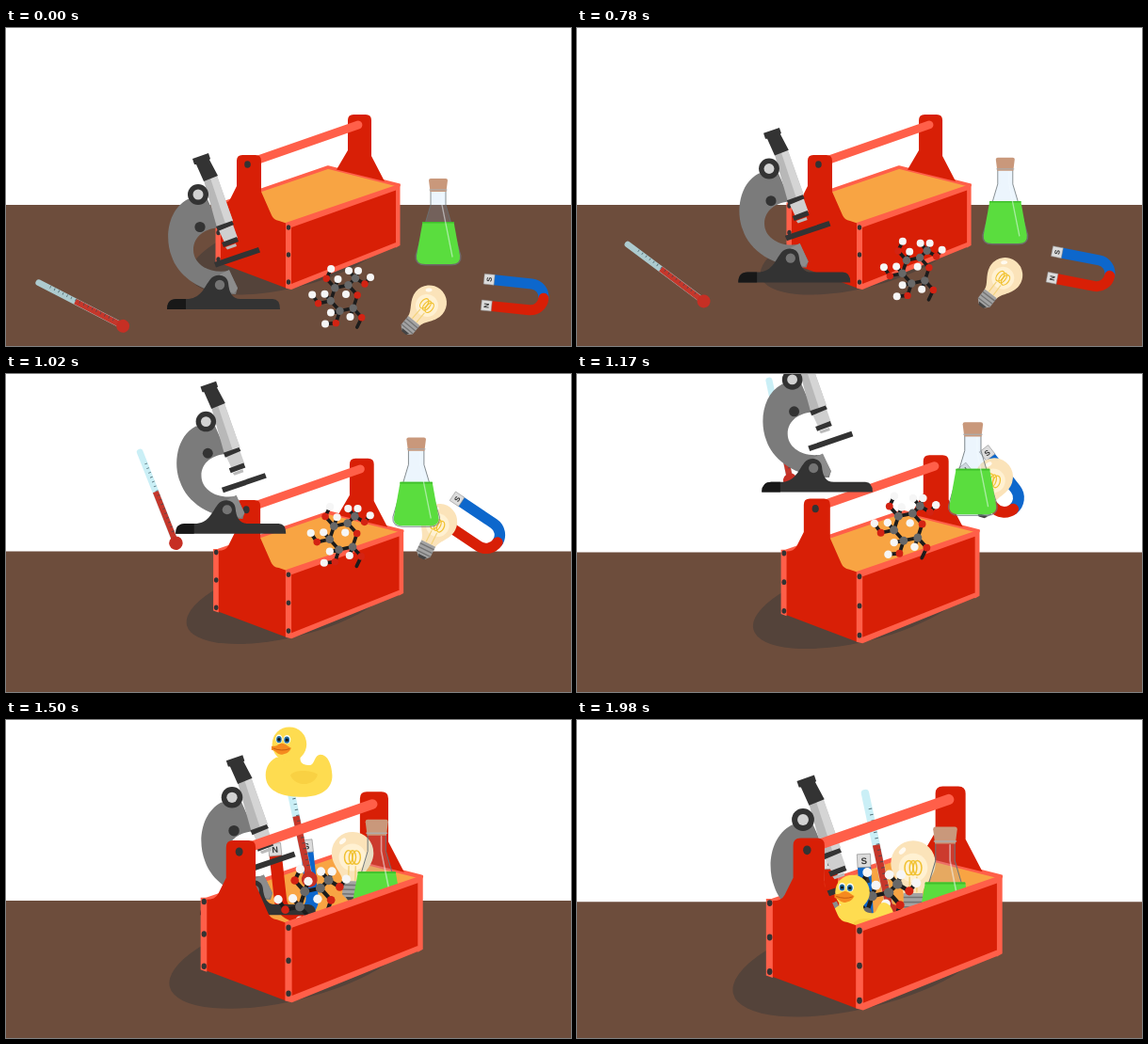
An HTML page for the animation above (4170 ms loop, 600x338 px).

```html
<!DOCTYPE html>
<html lang="en">
<head>
<meta charset="utf-8">
<title>Science toolbox</title>
<style>
  html, body { margin: 0; width: 100%; height: 100%; overflow: hidden; background: #fff; }
  svg { display: block; width: 100%; height: 100%; }
  text { font: bold 7.5px "Liberation Sans", Arial, sans-serif; text-anchor: middle; fill: #333; }
  .red { fill: #d81f06; }
  .coral { fill: #ff5f49; }
  .dark { fill: #333; }
  .line { fill: none; stroke-linecap: round; stroke-linejoin: round; }
</style>
</head>
<body>
<svg viewBox="0 0 600 338">
  <defs>
    <g id="front">
      <path class="line" d="M262 142 374 103" stroke="#ff5f49" stroke-width="8.8"/>
      <path class="red" d="M225 187Q235 188 238 182L245 168V141Q245 135 251 135H265Q271 135 271 141V174L282 199Q284 204 290 205L299 208V277L225 249Z"/>
      <ellipse class="dark" cx="256.500" cy="145" rx="3.300" ry="3.800"/>
      <path class="red" d="M300 208 416 168V232L300 276Z"/>
      <path class="coral" d="M222.500 185.500H228V251L222.500 249Z M297 207 418.500 165.500V231L414 233.500V172.500L303 212V272L414 228V233L303 278 297 276.500Z"/>
      <g class="dark" id="screws"></g>
    </g>
  </defs>

  <g id="camera">
    <path d="M-20 188H620V420H-20Z" fill="#6d4d3c"/>
    <ellipse cx="302.500" cy="237.500" rx="110.500" ry="38.500" transform="rotate(-14 302.500 237.500)" fill="#54433a"/>
    <path d="M228 187 342 147 417 167 300 211Z" fill="#f8a443"/>
    <path class="line" d="M228 187 342 148 417 167" stroke="#ff5f49" stroke-width="3.600" stroke-linejoin="miter"/>
    <path class="red" d="M363 98Q363 92 369 92H382Q388 92 388 98V136L402 163 351 150.500 363 130Z"/>
    <use id="frontUnder" href="#front"/>
  </g>

  <g id="magnet">
    <path class="line" d="M-27 -14H13A14 14 0 0 1 27 0" stroke="#0d67cc" stroke-width="11" stroke-linecap="butt"/>
    <path class="line" d="M-27 14H13A14 14 0 0 0 27 0" stroke="#d81f06" stroke-width="11" stroke-linecap="butt"/>
    <path d="M-38 -19.500h11v11h-11Z M-38 8.500h11v11h-11Z" fill="#dcdcdc" stroke="#888" stroke-width=".5"/>
    <text transform="translate(-29.800 -14) rotate(-90)">S</text>
    <text transform="translate(-29.800 14) rotate(-90)">N</text>
  </g>

  <g id="thermometer">
    <g transform="translate(0 52)">
      <path d="M-3.300 -5V-101Q-3.300 -104 0 -104T3.300 -101V-5Z" fill="#bdebf4" opacity=".8"/>
      <path d="M-3 -4V-57H3V-4Z" fill="#c5372b"/>
      <circle r="7" fill="#c62f24"/>
      <path d="M1.500 -12V-92" stroke="#334c55" stroke-width="2.800" stroke-dasharray=".8 4.200" opacity=".75"/>
    </g>
  </g>

  <g id="microscope">
    <path d="M-11 5C-32 16 -36 46 -28 66C-21 87 4 106 40 106L42 99 33 81C12 85 -5 74 -5 59C-5 44 8 36 23 35L10 5Z" fill="#7b7b7b"/>
    <path d="M23 85 33 80 42 100 38 105 32 103Z" fill="#8c8c8c"/>
    <path d="M6 -15 20 -20 37 28 20 35Z" fill="#b8b8b8"/>
    <path d="M13 -17.500 20 -20 37 28 29 31Z" fill="#d5d5d5"/>
    <path d="M22 38 37 32 42 46 28 51Z" fill="#cfcfcf"/>
    <path d="M29 56 40 52 41 55 31 58.500Z" fill="#bbb"/>
    <g class="dark">
      <path d="M-6 -38 11 -44 13 -38 12 -37 21 -20 6 -14 -2 -32 -4 -32Z"/>
      <path d="M19 34 36 28 38 32 21 39Z M25 51 41 45 43 50 27 56Z M17 72 64 56 66 61.500 19 77.500Z"/>
      <circle r="11"/><circle cx="2" cy="34.500" r="5.600"/>
      <path d="M-33 122Q-33 111 -23 111H-10C4 109 6 99 13 90C19 83 31 85 32 94C33 104 36 111 45 111H79Q87 111 87 122Z"/>
    </g>
    <path d="M-33 122Q-33 111 -23 111H-13V122Z" fill="#181818"/>
    <circle r="5.500" fill="#d2d2d2"/>
    <circle cx="23" cy="96" r="5.200" fill="#747474"/>
  </g>

  <g id="bulb">
    <path d="M-8 26C-8 18 -18.500 12 -18.500 0A18.500 18.500 0 0 1 18.500 0C18.500 12 8 18 8 26Z" fill="#fbe3b9"/>
    <circle cy="4" r="12" fill="#fff1d2"/>
    <path class="line" d="M-3 24V12M3 24V12" stroke="#f2d27c" stroke-width="1.200"/>
    <g class="line" stroke="#f1c232" stroke-width="1.200">
      <ellipse cx="-3.500" cy="4" rx="3.500" ry="6"/><ellipse cx="3.500" cy="4" rx="3.500" ry="6"/><ellipse cy="4" rx="3" ry="6"/>
    </g>
    <ellipse cx="-9" cy="-10" rx="3.500" ry="2" transform="rotate(-45 -9 -10)" fill="#fffaf0"/>
    <path d="M-8 25H8V37L4 41H-4L-8 37Z" fill="#a3a3a3"/>
    <path d="M-8 28.500H8M-8 32.500H8M-8 36.500H8" stroke="#747474" stroke-width="1.300"/>
    <path d="M-5 39H5L3 42H-3Z" fill="#444"/>
  </g>

  <g id="flask">
    <path d="M-8 -34H8V-18L24 36Q25 46 14 46H-14Q-25 46 -24 36L-8 -18Z" fill="#8fc0f0" fill-opacity=".17" stroke="#6b7478" stroke-width=".8"/>
    <path d="M-16.500 0H16.500L23 36Q24 45 14 45H-14Q-24 45 -23 36Z" fill="#5add3e"/>
    <path d="M-16.500 0H16.500L17 1.500H-17Z" fill="#3fbf2b"/>
    <path class="line" d="M4 -31V-18L15 37" stroke="#f4fbff" stroke-width="1.300" opacity=".5"/>
    <path d="M-10 -44Q-10 -46 -8 -46H8Q10 -46 10 -44L8.500 -32H-8.500Z" fill="#c9987b"/>
    <path d="M-9.500 -34H9.500" stroke="#a8b0b4" stroke-width="1"/>
  </g>

  <g id="molecule"></g>

  <g id="duck">
    <path d="M-14 14C-23 19 -26 27 -25 36C-23 51 -6 56 14 56C34 56 46 47 45.500 33C45 22 41 11 33 11C27 11 27 20 23 22C15 23 10 20 12 12Z" fill="#fedc50"/>
    <path d="M1 33C6 26 24 28 30 32C28 44 7 47 1 33Z" fill="#f9d143"/>
    <circle r="18.300" fill="#fedc50"/>
    <g fill="#fff"><ellipse cx="-11" cy="-5.500" rx="3.700" ry="4.600"/><ellipse cx="-2.500" cy="-5" rx="3.900" ry="4.600"/></g>
    <g fill="#236b9e"><ellipse cx="-11" cy="-5" rx="2.800" ry="3.600"/><ellipse cx="-2.700" cy="-4.500" rx="2.900" ry="3.600"/></g>
    <circle cx="-11" cy="-5" r="1.600" fill="#111"/><circle cx="-2.700" cy="-4.500" r="1.600" fill="#111"/>
    <path d="M-19 2C-13 3 -11 -1 -8 -1C-4 -1 -1 3 2 4C0 9 -5 11 -9 11C-14 10 -14 7 -19 6Z" fill="#f58a1f"/>
    <path class="line" d="M-17 4.500Q-8 8 0 5" stroke="#c95b10" stroke-width="1"/>
  </g>

  <g id="frontOver"><use href="#front"/></g>
</svg>

<script>
const LOOP = 4170, START = 660, STEP = 30, LAST = 45;
const ENTER_BOX = 21, LANDED = 33;

const el = id => document.getElementById(id);
const lerp = (a, b, u) => a + (b - a) * u;
const ramp = (a, b, n) => Math.min(1, Math.max(0, (n - a) / (b - a)));
const ease = (a, b, n) => { const u = ramp(a, b, n); return u * u * (3 - 2 * u); };
const softEase = (a, b, n) => { const u = ramp(a, b, n); return u ** 3 * (10 - 15 * u + 6 * u * u); };

function drawScrews() {
  const screw = (x, y) => `<ellipse cx="${x}" cy="${y}" rx="2.2" ry="2.7"/>`;
  el("screws").innerHTML = [0, 1, 2].map(i => screw(225.5, 189 + 28.5 * i) + screw(300, 212 + 29 * i)).join("");
}

// Sugar: a six-atom ring, four hydroxyl arms and one longer side chain
function drawMolecule() {
  const bonds = [], atoms = [];
  const polar = (deg, r) => [2 + r * Math.cos(deg * Math.PI / 180), 2 + r * Math.sin(deg * Math.PI / 180)];
  const atom = ([x, y], r, fill) => atoms.push(`<circle cx="${x}" cy="${y}" r="${r}" fill="${fill}"/>`);
  const carbon = p => atom(p, 4.2, "#686868");
  const oxygen = p => atom(p, 3.7, "#d32313");
  const hydrogen = p => atom(p, 4, "#f6f6f6");
  const bond = (...points) => bonds.push("M" + points.join(" "));

  const ring = [0, 1, 2, 3, 4, 5].map(i => polar(48 + 60 * i, 14.5));
  bond(...ring, ring[0]);
  ring.forEach((p, i) => (i < 5 ? carbon : oxygen)(p));
  for (let i = 0; i < 4; i++) {
    const angle = 48 + 60 * i, o = polar(angle, 28), end = polar(angle + 18, 34), side = polar(angle + 24, 21);
    bond(ring[i], o, end);
    bond(ring[i], side);
    oxygen(o);
    hydrogen(side);
    if (i) hydrogen(end);
  }
  const tip = [14, -19], o = [24, -13], ends = [[7, -27], [17, -27], [30, -20]];
  bond(ring[4], tip, o, ends[2]);
  bond(ends[0], tip, ends[1]);
  carbon(tip);
  oxygen(o);
  [...ends, [4, -2]].forEach(hydrogen);
  el("molecule").innerHTML =
    `<path class="line" stroke="#1c1c1c" stroke-width="3.6" d="${bonds.join("")}"/>` + atoms.join("");
}

// Each item rises from the table to its top, then drops into the box
const items = {
  magnet: { from: [544, 284.5], to: [289, 192], top: 116, sway: 47, turn: [6, 87] },
  thermometer: { from: [78, 293], to: [319, 139], top: 36, peak: 22, turn: [-62.7, -12], spin: [0, 18] },
  microscope: { from: [204, 177], to: [240, 106], top: 1, drift: [8, 24], shrink: 0.845 },
  bulb: { from: [449.5, 292], to: [357, 152], top: 104, sway: 47, turn: [40, 0] },
  flask: { from: [459, 206], to: [391, 172.5], top: 100, peak: 17 },
  molecule: { from: [357, 285], to: [323, 198], top: 159, peak: 16, sway: 12, shrink: 0.97 }
};

function place(id, x, y, turn, size) {
  el(id).setAttribute("transform", `translate(${x} ${y}) rotate(${turn}) scale(${size})`);
}

function hop(id, n, zoom) {
  const { from, to, top, peak = 20, sway = 0, turn = [0, 0], shrink = 1,
    drift = [0, LANDED], spin = drift } = items[id];
  const u = ease(...drift, n);
  const x = lerp(from[0], to[0], u) + sway * 4 * u * (1 - u);
  const y = n < peak ? lerp(from[1], top, ease(0, peak, n)) : lerp(top, to[1], ease(peak, LANDED, n));
  place(id, x, y, lerp(...turn, ease(...spin, n)), zoom * lerp(1, shrink, ease(0, LANDED, n)));
}

function draw(n) {
  const zoom = lerp(1, 1.28, softEase(2, LAST, n));
  const view = `translate(300 169) scale(${zoom}) translate(-300 -169)`;
  el("camera").setAttribute("transform", view);
  el("frontOver").setAttribute("transform", view);
  const inside = n >= ENTER_BOX;
  el("frontUnder").style.display = inside ? "none" : "";
  el("frontOver").style.display = inside ? "" : "none";
  for (const id in items) hop(id, n, zoom);
  const duckY = -80 + 281 * ease(24, 36, n) - 18 * ease(37, LAST, n);
  place("duck", lerp(306, 292.5, ease(24, 36, n)), duckY, 0, 1);
}

function tick() {
  const t = performance.now() % LOOP;
  draw(t < START ? 0 : Math.min(LAST, Math.floor((t - START) / STEP) + 1));
  requestAnimationFrame(tick);
}

drawScrews();
drawMolecule();
tick();
</script>
</body>
</html>
```
